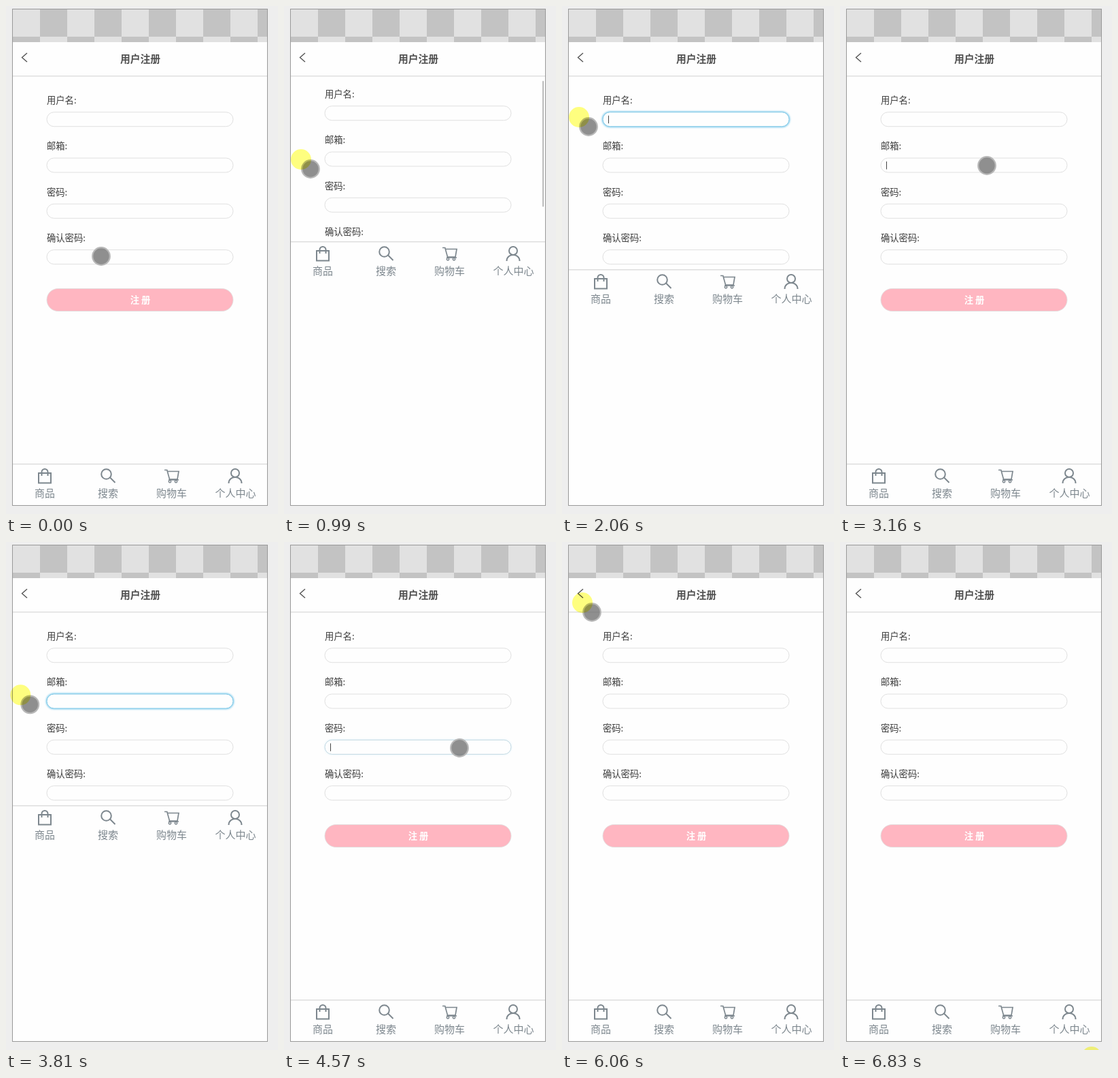
Write an HTML page that moves like this. It is 400 px wide and 745 px high and loops after 6.95 s.

```html
<!DOCTYPE html>
<html lang="zh-CN">
<head>
<meta charset="utf-8">
<style>
  html, body { margin: 0; width: 100%; height: 100%; overflow: hidden; background: #eee; }
  svg { display: block; font-family: "Noto Sans CJK SC", "Noto Sans CJK", sans-serif; }
  .icon { fill: none; stroke: #7d878e; stroke-width: 2; }
  .tab { fill: #7d878e; font-size: 15px; text-anchor: middle; }
  .label { fill: #3c3c3c; font-size: 13.3px; }
  .bold { font-weight: 700; text-anchor: middle; }
</style>
</head>
<body>
<svg width="400" height="745" viewBox="0 0 400 745">
  <defs>
    <pattern id="checker" x="10" y="5" width="80" height="80" patternUnits="userSpaceOnUse">
      <path fill="#e1e1e1" d="M0 0h80v80H0z"/>
      <path fill="#c3c3c3" d="M40 0h40v40H40zM0 40h40v40H0z"/>
    </pattern>
    <clipPath id="screen"><path d="M10 5h374v727H10z"/></clipPath>
    <clipPath id="view"><rect id="viewRect" x="10" y="103" width="374" height="568"/></clipPath>
    <filter id="blur" x="-10%" y="-60%" width="120%" height="220%"><feGaussianBlur stdDeviation="1.3"/></filter>
  </defs>

  <rect x="9.5" y="4.5" width="375" height="728" fill="#fefefe" stroke="#999"/>
  <path fill="url(#checker)" d="M10 5h374v48H10z"/>
  <path d="M31 69l-7.5 6.5 7.5 6.5" fill="none" stroke="#555" stroke-width="1.4"/>
  <text class="bold" x="197.5" y="83.3" font-size="14.8" fill="#505050">用户注册</text>

  <g clip-path="url(#view)">
    <g id="form">
      <g id="fields"></g>
      <rect x="60" y="414.5" width="274" height="33" rx="16.5" fill="#ffb6c1" stroke="#ddd" stroke-width=".8"/>
      <text class="bold" x="197.5" y="435.6" font-size="13.3" fill="#fff">注 册</text>
    </g>
    <rect id="bar" x="380" width="2" rx="1" fill="#bbb"/>
  </g>
  <path d="M10 102.7h374" stroke="#e0e0e0" stroke-width="1.6"/>

  <g id="nav">
    <path d="M10 671.7h374" stroke="#dedede" stroke-width="1.6"/>
    <g class="icon">
      <path d="M48 685h18v14.500h-18zM52.500 689v-5.500a4.500 4.500 0 0 1 9 0v5.500"/>
      <path d="M153 691.500l7.500 7.500"/><circle cx="147.500" cy="686.500" r="7.300"/>
      <path stroke-width="1.700" d="M233 680.500h3.800l3.700 13.500h11.500l2-11.500h-16.500M239 695h15"/>
      <circle cx="241" cy="697.300" r="1.700" stroke-width="1.500"/><circle cx="250" cy="697.300" r="1.700" stroke-width="1.500"/>
      <circle cx="337" cy="685" r="6"/><path d="M327.500 700c0-12 19-12 19 0"/>
    </g>
    <text class="tab" x="57" y="719.600">商品</text>
    <text class="tab" x="150" y="719.600">搜索</text>
    <text class="tab" x="243.500" y="719.600">购物车</text>
    <text class="tab" x="337.500" y="719.600">个人中心</text>
  </g>

  <g clip-path="url(#screen)">
    <circle id="touch" r="12.800" fill="#707070" fill-opacity=".78" stroke="#b8b8b8" stroke-width="2.200"/>
  </g>
  <circle id="halo" r="15" fill="#ffff80" style="mix-blend-mode:multiply"/>
</svg>
<script>
const LOOP = 6950, STEPS = 64, TOP = 103, NAV = 671, CONTENT = 317;
const $ = id => document.getElementById(id);
const clamp = v => Math.max(0, Math.min(1, v));

// step, x, y of the touch point
const path = [
  [0, 140, 367], [1, 140, 367], [4, 80, 300], [7, 36, 255], [9, 39, 239], [12, 36, 110],
  [13, 40, 120], [15, 170, 168], [16, 170, 168], [19, 39, 177], [22, 31, 225], [24, 29, 195],
  [26, 31, 200], [28, 180, 228], [29, 216, 234], [30, 216, 234], [33, 34, 215], [36, 36, 250],
  [39, 38, 150], [40, 60, 150], [41, 258, 302], [43, 258, 302], [47, 60, 318], [50, 49, 313],
  [55, 44, 103], [56, 44, 103], [58, 100, 270], [60, 222, 639], [62, 330, 735], [63, 384, 769]
];
// step, scroll offset
const scrolls = [
  [0, 0], [8, 0], [9, 9], [11, 75], [13, 75], [14, 0], [21, 0], [23, 34], [25, 34], [26, 0],
  [36, 0], [38, 34], [39, 34], [40, 0], [49, 0], [50, 3], [53, 75], [55, 75], [56, 0]
];
// The password keyboard is taller, so the tab bar sits higher.
const sessions = [
  { field: 3, focus: 1, open: 3, blur: 14, nav: 345 },
  { field: 0, focus: 16, open: 18, blur: 26, nav: 386 },
  { field: 1, focus: 29, open: 31, blur: 40, nav: 386 },
  { field: 2, focus: 41, open: 44, blur: 56, nav: 345 }
];
const taps = [[0, 1], [15, 16], [29, 30], [41, 43]];

$('fields').innerHTML = ['用户名', '邮箱', '密码', '确认密码'].map((name, i) => {
  const y = 155.7 + i * 67.3;
  const box = `x="60" y="${y}" width="274" height="21" rx="10.5"`;
  return `<text class="label" x="60" y="${y - 12.8}">${name}:</text>
    <rect ${box} fill="none" stroke="#61bfe8" stroke-width="3" filter="url(#blur)" opacity="0"/>
    <rect ${box} fill="#fefefe" stroke="#e0e0e0"/>
    <path d="M68.5 ${y + 5}v11.500" stroke="#444" opacity="0"/>`;
}).join('');
const fields = [0, 1, 2, 3].map(i => [...$('fields').children].slice(i * 4 + 1, i * 4 + 4));

function at(keys, step) {
  const i = keys.findIndex(k => k[0] >= step);
  if (i < 0) return keys[keys.length - 1].slice(1);
  if (i === 0) return keys[0].slice(1);
  const a = keys[i - 1], b = keys[i], u = (step - a[0]) / (b[0] - a[0]);
  return a.slice(1).map((v, j) => v + (b[j + 1] - v) * u);
}

function place(el, x, y) { el.setAttribute('transform', `translate(${x} ${y})`); }

function draw(now) {
  const step = Math.min(STEPS - 1, Math.floor((now % LOOP + 25) / LOOP * STEPS));
  const active = sessions.find(s => step >= s.focus && step < s.blur);
  const nav = active && step >= active.open ? active.nav : NAV;
  const [scroll] = at(scrolls, step);
  const [x, y] = at(path, step);
  const height = nav - TOP;

  $('viewRect').setAttribute('height', height);
  place($('nav'), 0, nav - NAV);
  place($('form'), 0, -scroll);

  const bar = $('bar');
  bar.setAttribute('opacity', scroll > 0 ? 1 : 0);
  bar.setAttribute('y', TOP + scroll * height / CONTENT);
  bar.setAttribute('height', height * height / CONTENT);

  fields.forEach(([glow, box, caret], i) => {
    const on = active && active.field === i;
    const age = on ? step - active.focus : 0;
    const focus = clamp(age / 3);
    glow.setAttribute('opacity', focus * focus * 0.7);
    box.setAttribute('stroke', `rgb(${224 - 96 * focus},${224 - 24 * focus},${224 + 6 * focus})`);
    caret.setAttribute('opacity', on && age % 10 < 5 || on && age > 8 ? 1 : 0);
  });

  place($('touch'), x, y);
  place($('halo'), x - 14, y - 14);
  $('halo').setAttribute('opacity', taps.some(([a, b]) => step >= a && step <= b) ? 0 : 1);
}

const start = performance.now();
function tick() {
  draw(performance.now() - start);
  requestAnimationFrame(tick);
}
tick();
</script>
</body>
</html>
```
